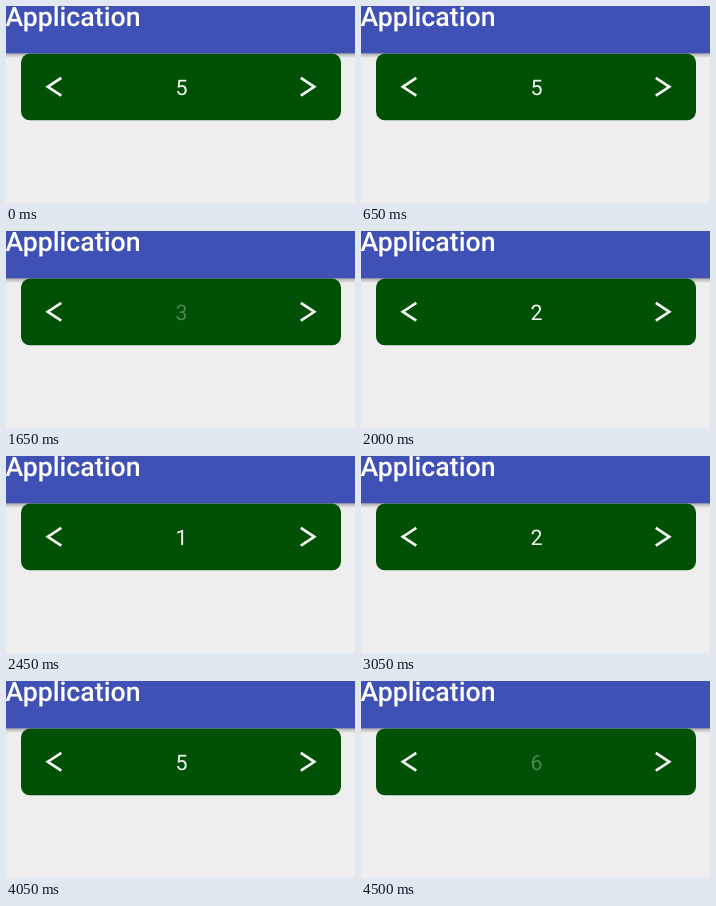
These frames come from a looping animation (349 px wide and 197 px high, 4.55 s). An HTML page:

```html
<!DOCTYPE html>
<html lang="en">
<head>
<meta charset="utf-8">
<title>Number picker</title>
<style>
  html, body { margin: 0; width: 100%; height: 100%; overflow: hidden; background: #eee; }
  svg { display: block; width: 349px; height: 197px; font-family: Roboto, sans-serif; fill: #fff; }
  .title { font-size: 26.7px; font-weight: 500; text-rendering: geometricPrecision; }
  .digit { font-size: 21.4px; text-anchor: middle; fill: #f0f5f0; text-rendering: geometricPrecision; }
  .arrow { fill: none; stroke: #f6faf6; stroke-width: 2.7; }
</style>
</head>
<body>
<svg viewBox="0 0 349 197">
  <defs>
    <linearGradient id="shade" x2="0" y2="1">
      <stop stop-color="#000" stop-opacity=".3"/>
      <stop offset="1" stop-color="#000" stop-opacity="0"/>
    </linearGradient>
  </defs>
  <rect y="47" width="349" height="5" fill="url(#shade)"/>
  <rect x="15" y="47.6" width="320" height="66.7" rx="9" fill="#005005"/>
  <rect width="349" height="47.3" fill="#3f51b5"/>
  <text class="title" x="-.5" y="20.3">Application</text>
  <path class="arrow" d="M55.3 71.8L41.8 80.8L55.3 89.6M294.8 71.8L308.3 80.8L294.8 89.6"/>
  <text class="digit" id="leaving" y="88.8"/>
  <text class="digit" id="current" y="88.8"/>
</svg>
<script>
const LOOP = 4550, TICK = 50, CENTER = 175.5, FIRST = 5;
// start, duration, new value
const swaps = [
  [850, 100, 4], [1250, 150, 3], [1650, 150, 2], [2100, 150, 1], [2900, 150, 2],
  [3250, 150, 3], [3500, 150, 4], [3900, 150, 5], [4250, 150, 6], [4500, 150, 7]
];
const leaving = document.getElementById('leaving');
const current = document.getElementById('current');

function place(el, value, shift, alpha) {
  el.textContent = value;
  el.setAttribute('x', CENTER + shift);
  el.setAttribute('opacity', alpha);
}

function draw(now) {
  const t = Math.floor((now % LOOP) / TICK) * TICK;
  let from = FIRST, to = FIRST, p = 1;
  for (const [start, duration, value] of swaps) {
    if (t < start) break;
    from = to;
    to = value;
    p = Math.min(1, (t - start) / duration);
  }
  // Larger values enter from the right, smaller ones from the left.
  const side = Math.sign(to - from);
  place(current, to, side * 126 * (1 - p), p * (0.8 + 0.2 * p));
  place(leaving, from, -side * 66 * p, Math.max(0, 0.32 - 0.75 * p));
}

const origin = performance.now();
function loop() {
  draw(performance.now() - origin);
  requestAnimationFrame(loop);
}
loop();
</script>
</body>
</html>
```
